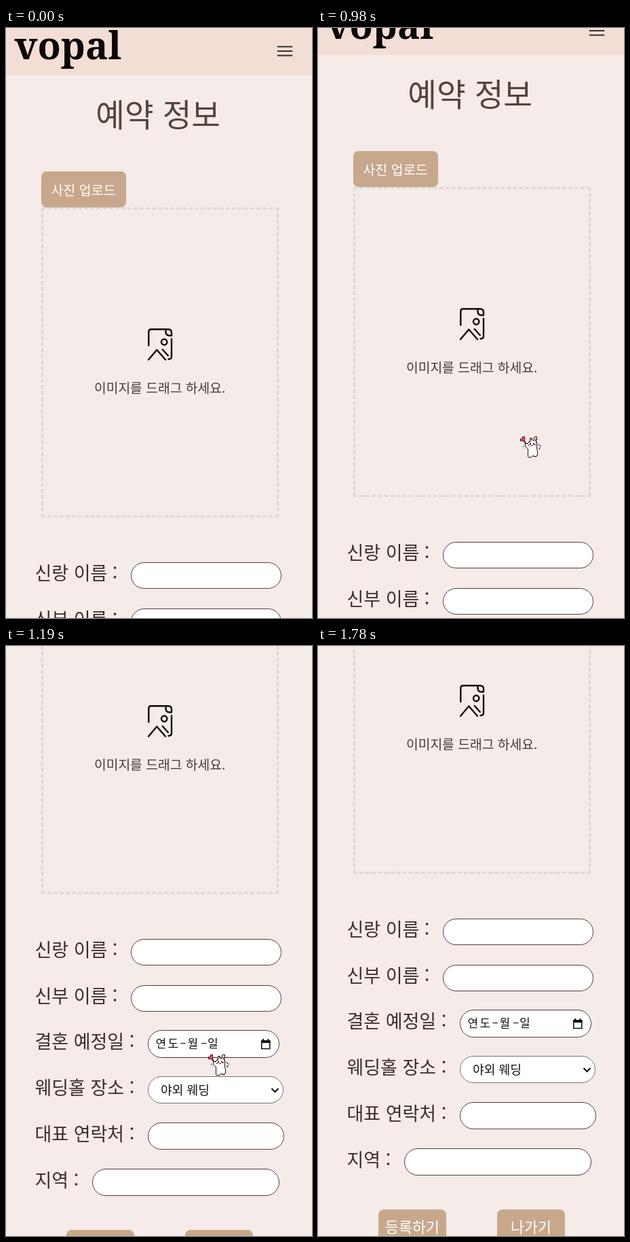
These frames come from a looping animation (451 by 868 pixels, 2790 ms). An HTML page:

```html
<!DOCTYPE html>
<html lang="ko">
<head>
<meta charset="utf-8">
<title>예약 정보</title>
<style>
  html, body { margin: 0; width: 100%; height: 100%; overflow: hidden; background: #f5ebe8; }
  #stage { position: absolute; inset: 0; overflow: hidden; }
  #page { position: absolute; left: 0; top: 0; width: 451px; height: 1280px; }
  #drop { position: absolute; left: 52px; top: 264px; width: 350px; height: 456px;
    box-sizing: border-box; border: 3px dashed #dadada; }
  svg { position: absolute; left: 0; top: 0; display: block; }
  text { font-family: "Noto Sans CJK KR", "Noto Sans CJK", "Noto Sans CJK JP", sans-serif;
    font-weight: 350; white-space: pre; }
  .brand { font: 700 56px "Noto Serif", serif; fill: #0b0706; }
  .title { font-size: 46.4px; fill: #55443c; text-anchor: middle; }
  .label { font-size: 27px; fill: #3b2e2a; }
  .hint { font-size: 19.3px; fill: #453c39; text-anchor: middle; }
  .field { fill: #fff; stroke: #513d3a; }
  .btn { fill: #c8a88c; }
  .btn-text { fill: #fff; text-anchor: middle; }
  .icon { fill: none; stroke: #0d0b0b; stroke-width: 2.4; stroke-linecap: round; stroke-linejoin: round; }
</style>
</head>
<body>
<div id="stage">
  <div id="page">
    <div id="drop"></div>
    <svg id="form" width="451" height="1280">
      <rect width="451" height="69" fill="#f2ded5"/>
      <text class="brand" x="12.5" y="46">vopal</text>
      <path d="M399.75 27.5h22.5M399.75 34h22.5M399.75 40.5h22.5" stroke="#333" stroke-width="2.2"/>
      <text class="title" x="224.2" y="145.3">예약 정보</text>

      <rect class="btn" x="52" y="211" width="125" height="53" rx="8"/>
      <text class="btn-text" x="114" y="245.5" font-size="19.5">사진 업로드</text>

      <g class="icon">
        <path d="M210.3 467V447q0-3.700 3.700-3.700h22"/>
        <path d="M235.500 443.300h3.500q5 0 5 5v4.200h-3q-5.500 0-5.500-5.500z"/>
        <path d="M244 457.500v26q0 3.500-4.500 3.700"/>
        <circle cx="233.200" cy="462" r="4.200"/>
        <path d="M210 488l12.300-14.500L235 488M230.800 473l8 9"/>
      </g>
      <text class="hint" x="226.7" y="537.4">이미지를 드래그 하세요.</text>
    </svg>
  </div>

  <svg id="cursor" width="32" height="32" shape-rendering="crispEdges">
    <path d="M5 6l7 8" stroke="#3a0c18" stroke-width="2"/>
    <path d="M1 4h3V1h3v6H1z" fill="#e2556c" stroke="#6a0f28"/>
    <path d="M9 11l3 1 1-2 3-2-1-4 2-1 3 4h1l1-5 3-1 1 2-2 5 2 4-1 3 1 6 1 4-1 4-3 2-3-2-2 2h-5l-1-5v-7l-4-4z"
      fill="#fff" stroke="#1c1416"/>
    <path d="M27 12h2v2h2v3h-2v2h-2" fill="none" stroke="#3f394c" stroke-dasharray="2 1"/>
    <path d="M15 11h2v2h-2zM20 11h2v2h-2zM17 14h3v1h-3z" fill="#1c1416"/>
    <path d="M23 5h1v3h-1zM17 5h1v2h-1zM13 13h2v2h-2zM22 12h2v2h-2zM25 8h1v2h-1z" fill="#dc3d55"/>
    <path d="M4 15h1v-1h1v1h1v1H6v1H5v-1H4zM9 4h2v1H9zM28 4h2v1h-2zM6 18h1v1H6z" fill="#ee8c90"/>
  </svg>
</div>
<script>
const LOOP = 2790;
const form = document.getElementById("form");
const page = document.getElementById("page");
const cursor = document.getElementById("cursor");

function add(tag, attrs, text) {
  const el = document.createElementNS("http://www.w3.org/2000/svg", tag);
  for (const key in attrs) el.setAttribute(key, attrs[key]);
  if (text) el.textContent = text;
  form.appendChild(el);
  return el;
}

// label, field left, top, right, bottom
const rows = [
  ["신랑 이름 :", 184, 786, 406, 825],
  ["신부 이름 :", 184, 854, 406, 893],
  ["결혼 예정일 :", 209, 920, 403, 961],
  ["웨딩홀 장소 :", 209, 988, 409, 1028],
  ["대표 연락처 :", 209, 1056, 410, 1096],
  ["지역 :", 127, 1124, 403, 1164]
];
rows.forEach(([label, left, top, right, bottom], i) => {
  add("text", { class: "label", x: 42.4, y: 812 + Math.round(67.7 * i) }, label);
  const field = add("rect", {
    class: "field", x: left + 0.5, y: top + 0.5,
    width: right - left - 1, height: bottom - top - 1, rx: (bottom - top - 1) / 2
  });
  if (i === 3) field.style.stroke = "#767171";
});

// date field
add("text", { x: "220.5 238.5 256.5 267.5 287 297", y: 946, "font-size": 17, fill: "#111" }, "연도–월–일");
add("path", { d: "M376.75 936h12v11.500h-12z", fill: "none", stroke: "#111", "stroke-width": 1.6 });
add("path", { d: "M376 935h13.500v4H376zM378 933h2v3h-2zM385.500 933h2v3h-2z", fill: "#111" });

// select field
add("text", { x: 228, y: 1014.5, "font-size": 18.2, fill: "#111" }, "야외 웨딩");
add("path", { d: "M391.500 1006l5 5 5-5", fill: "none", stroke: "#111", "stroke-width": 2.2 });

[[89, "등록하기"], [264, "나가기"]].forEach(([x, text]) => {
  add("rect", { class: "btn", x, y: 1214, width: 100, height: 53, rx: 8 });
  add("text", { class: "btn-text", x: x + 50, y: 1248, "font-size": 21.7 }, text);
});

// each entry holds until the next: time, then values
const scrollSteps = [[0, 0], [980, 30], [1050, 150], [1120, 285], [1190, 355], [1260, 385]];
const cursorSteps = [
  [0, -99, -99], [70, 431, 844], [130, -99, -99],
  [450, 404, 645], [530, 356, 625], [590, 315, 608], [650, 297, 600],
  [1590, 304, 613], [1650, 340, 692], [1720, 389, 808], [1780, -99, -99]
];
const at = (steps, t) => steps.filter(s => s[0] <= t).pop();

function draw(t) {
  const [, scroll] = at(scrollSteps, t);
  const [, x, y] = at(cursorSteps, t);
  page.style.transform = `translateY(${-scroll}px)`;
  cursor.style.transform = `translate(${x}px, ${y}px)`;
}

const start = performance.now();
function tick() {
  draw((performance.now() - start) % LOOP);
  requestAnimationFrame(tick);
}
draw(0);
requestAnimationFrame(tick);
</script>
</body>
</html>
```
